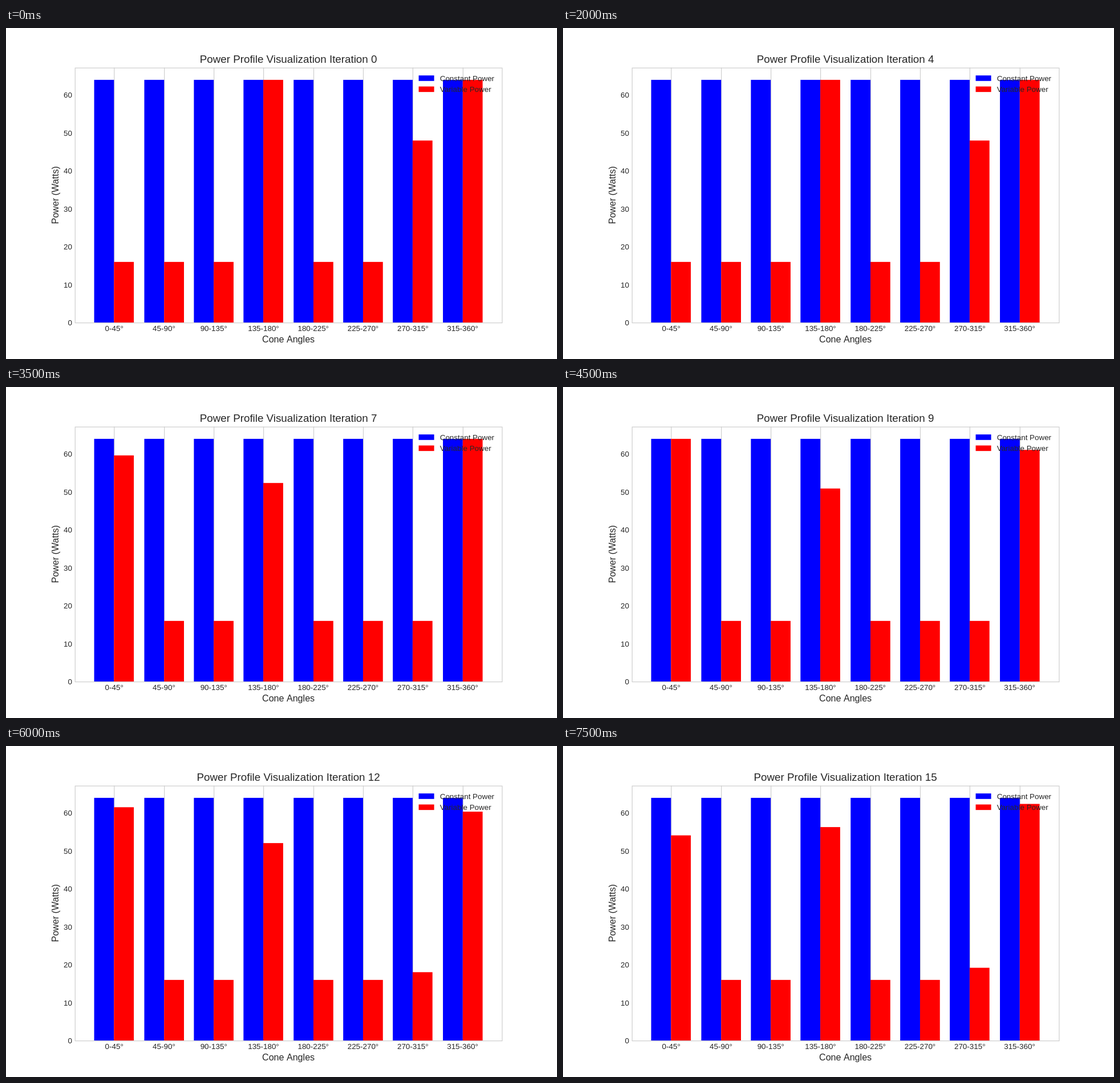
These frames come from a looping animation (966x580 px, 8000 ms). An HTML page with a canvas:

```html
<!DOCTYPE html>
<html lang="en">
<head>
<meta charset="utf-8">
<title>Power profile</title>
<style>
html, body { margin: 0; width: 966px; height: 580px; overflow: hidden; background: #fff; }
canvas { display: block; }
</style>
</head>
<body>
<canvas id="chart" width="966" height="580"></canvas>
<script>
const ctx = document.getElementById('chart').getContext('2d');
const STEP = 500, STEPS = 16;
const LEFT = 125, RIGHT = 900, TOP = 72, BOTTOM = 534;
const UNIT = (RIGHT - LEFT) / 8.58;   // width of one category
const WATT = 6.875;                   // height of one watt
const INK = '#262626', GRID = '#ccc', BLUE = '#00f', RED = '#f00';

const xAt = i => LEFT + (i + 0.79) * UNIT;
const yAt = watts => BOTTOM - watts * WATT;
const LOW = yAt(16), MID = yAt(48), FULL = yAt(64);

// Top edge of each moving red bar, one entry per iteration from 5 on
const tops = {
  0: [MID, 144, 124, 108, FULL, FULL, FULL, 111, 130, 147, 162],
  3: [FULL, 134, 174, 184, 184, 180, 178, 176, 168, 158, 147],
  6: [LOW, LOW, LOW, LOW, LOW, LOW, 412, 410, 406, 405, 402],
  7: [FULL, FULL, FULL, 104, 114, 118, 120, 119, 115, 110, 105]
};
const startTops = [LOW, LOW, LOW, FULL, LOW, LOW, MID, FULL];

function redTop(i, step) {
  if (step < 5) return startTops[i];
  return tops[i] ? tops[i][step - 5] : LOW;
}

function rect(x0, y0, x1, y1, color) {
  ctx.fillStyle = color;
  ctx.fillRect(x0, y0, x1 - x0, y1 - y0);
}

function bar(from, to, top, color) {
  rect(Math.round(xAt(from)), top, Math.round(xAt(to)), BOTTOM, color);
}

function text(str, x, y, points, align = 'center') {
  ctx.font = `${points * 100 / 72}px "Liberation Sans", Arial, sans-serif`;
  ctx.textAlign = align;
  ctx.fillStyle = INK;
  ctx.fillText(str, x, y);
}

function draw(step) {
  ctx.setTransform(1, 0, 0, 1, 0, 0);
  rect(0, 0, 966, 580, '#fff');
  ctx.scale(0.966, 580 / 600);
  ctx.strokeStyle = GRID;
  ctx.lineWidth = 1.2;

  ctx.beginPath();
  for (let i = 0; i < 8; i++) {
    const x = Math.round(xAt(i)) + 0.5;
    ctx.moveTo(x, TOP);
    ctx.lineTo(x, BOTTOM);
  }
  ctx.stroke();

  for (let i = 0; i < 8; i++) {
    bar(i - 0.4, i, FULL, BLUE);
    bar(i, i + 0.4, redTop(i, step), RED);
    text(`${i * 45}-${i * 45 + 45}°`, xAt(i), 549.5, 10);
  }
  ctx.strokeRect(LEFT + 0.5, TOP + 0.5, RIGHT - LEFT, BOTTOM - TOP);

  for (let w = 0; w <= 60; w += 10) text(w, 120, yAt(w) + 5, 10, 'right');

  text('Power Profile Visualization Iteration ' + step, 512.5, 63.6, 14);
  text('Cone Angles', 512.5, 570, 12);
  ctx.save();
  ctx.translate(95.5, 303);
  ctx.rotate(-Math.PI / 2);
  text('Power (Watts)', 0, 0, 12);
  ctx.restore();

  rect(749, 86, 777, 96, BLUE);
  rect(749, 106, 777, 116, RED);
  text('Constant Power', 787.5, 96, 10, 'left');
  text('Variable Power', 787.5, 116, 10, 'left');
}

const start = performance.now();
function tick() {
  draw(Math.floor((performance.now() - start) / STEP) % STEPS);
  requestAnimationFrame(tick);
}
tick();
</script>
</body>
</html>
```
